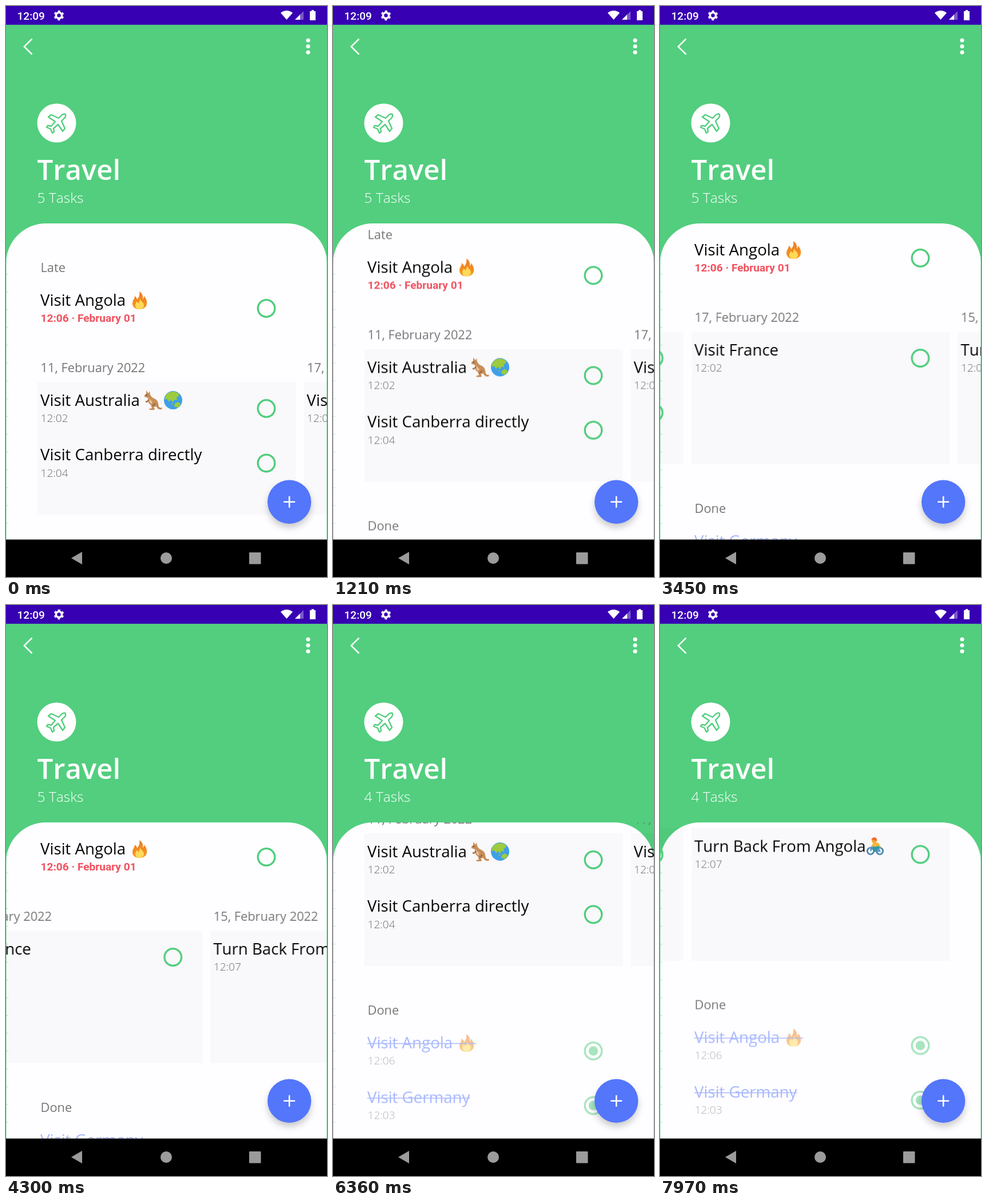
These frames come from a looping animation (561x998 px, 8 s). An HTML page:

```html
<!DOCTYPE html>
<html lang="en">
<head>
<meta charset="utf-8">
<title>Travel tasks</title>
<style>
  html, body { margin: 0; width: 100%; height: 100%; overflow: hidden; background: #52ce7e; }
  svg { display: block; width: 100vw; height: 100vh; font-family: "Open Sans", sans-serif; font-kerning: none; }
  .heading { font-size: 21.84px; fill: #767676; }
  .title { font-size: 27.65px; fill: #060606; }
  .time { font-size: 19.1px; font-weight: 300; fill: #6c6c6c; }
  .late { font: 700 19.1px Roboto, sans-serif; fill: #f0525f; }
  .praise { fill: #757575; }
  .hint { font-size: 19.1px; font-weight: 300; fill: #5f7de4; }
  .done { opacity: .5; }
  .done .title { fill: #5376fc; }
  .strike { stroke: #5376fc; stroke-width: 1.6; }
  .count { font-size: 24.57px; font-weight: 300; fill: #fff; }
  .ring { fill: none; stroke: #4fcd7c; stroke-width: 3.3; }
  .card { fill: #000; fill-opacity: .02; }
  #fab { filter: drop-shadow(0 7px 6px rgba(0, 0, 0, .2)); }
</style>
</head>
<body>
<svg viewBox="0 0 561 998" preserveAspectRatio="none">
  <defs>
    <clipPath id="listArea"><rect y="380" width="561" height="553"/></clipPath>
    <linearGradient id="flame" x2="0" y2="1">
      <stop stop-color="#ee7a24"/><stop offset="1" stop-color="#f79a1e"/>
    </linearGradient>
    <g id="fire">
      <path fill="url(#flame)" d="M13 0C18 3 20 8 19 13C21 12 21 10 21 8C25 12 27 17 26 22C25 28 20 31 13 31C6 31 1 27 1 21C1 15 5 13 5 8C8 10 9 12 9 14C13 10 14 5 13 0Z"/>
      <path fill="#ffd95a" d="M14 12C15 17 21 19 21 24C21 28 18 31 13 31C9 31 6 28 6 24C6 21 8 20 8 18C10 18 11 19 11 21C14 18 14 15 14 12Z"/>
    </g>
    <g id="kangaroo">
      <path fill="#c78d58" d="M4 0L8 5L10 1L11 7C13 12 16 13 20 15C25 18 25 23 26 28C28 31 30 30 32 30L31 33C25 34 23 31 22 28L17 29L19 32L18 34H10L9 32L14 31L12 25C8 23 7 19 7 13L1 11Q0 8 4 6Z"/>
      <path fill="#e7c199" d="M8 13C9 18 10 22 13 24L15 20Z"/>
      <path fill="none" stroke="#99633a" stroke-width="2" d="M9 16L5 20L3 19M20 23L15 27"/>
      <circle cx="5" cy="8" r="1" fill="#3b2a20"/>
    </g>
    <g id="globe">
      <circle r="16" fill="#3f9fe6"/>
      <path fill="#9ccb3f" d="M-13-9Q-7-16 3-15L11-11L9-6L6-5L7 0L2-1L0 4L-4-1L-7 3L-10-2L-15-1ZM3 6L8 3L13 6Q12 11 8 13L2 11ZM-4 5L1 7L-1 8Z"/>
    </g>
    <g id="biker">
      <g fill="none" stroke="#3f7fa6" stroke-width="2.6">
        <circle cx="7" cy="24" r="5.700"/><circle cx="23" cy="24" r="5.700"/>
        <path stroke="#4a8fd0" d="M7 24L10 16L16 24H23L19 17H10"/>
      </g>
      <path fill="#f6b93a" d="M12 9L20 9L25 16L20 19L12 15Z"/>
      <path fill="none" stroke="#f6b93a" stroke-width="3" d="M13 11L9 16"/>
      <path fill="none" stroke="#2b9c9c" stroke-width="4" d="M22 17L14 19L16 25"/>
      <circle cx="13" cy="6" r="4" fill="#f2a93c"/>
      <path fill="#ef6a2c" d="M8 4Q10 0 15 0Q19 2 18 7Q12 4 8 4Z"/>
    </g>
  </defs>

  <rect width="561" height="998" fill="#52ce7e"/>
  <rect width="561" height="32.800" fill="#3700b3"/>
  <g fill="#fff">
    <text x="19.5" y="24" style="font:500 19.1px Roboto,sans-serif">12:09</text>
    <g fill="none" stroke="#fff">
      <circle cx="92.500" cy="16.500" r="5" stroke-width="3.6"/>
      <circle cx="92.500" cy="16.500" r="7.600" stroke-width="2.400" stroke-dasharray="4 3.96" stroke-dashoffset="-1.98"/>
    </g>
    <path d="M480 12Q490.500 4 501 12L490.500 24Z"/>
    <path d="M520 9V24H505Z" opacity=".35"/><path d="M514 15V24H505Z"/>
    <path d="M531 9H534V7H538V9H541V25H531Z"/>
    <path d="M45.500 57.500L31.800 71L45.500 84.500" fill="none" stroke="#fff" stroke-width="2.500"/>
    <circle cx="528" cy="60" r="3.6"/><circle cx="528" cy="70.500" r="3.6"/><circle cx="528" cy="81" r="3.6"/>
    <circle cx="88.500" cy="204.500" r="34"/>
    <text x="54.500" y="304" font-size="49.1" font-weight="600">Travel</text>
  </g>
  <path fill="none" stroke="#52ce7e" stroke-width="2.4" stroke-linejoin="round"
    d="M98 190L92 196L79 190L74 194L86 202L79 210L73 209L71 212L78 215L81 222L84 220L83 214L91 207L99 219L103 214L97 201L103 195Q107 186 98 190Z"/>
  <text class="count" id="fiveTasks" x="54.500" y="344">5 Tasks</text>
  <text class="count" id="fourTasks" x="54.500" y="344">4 Tasks</text>

  <path fill="#fefdff" d="M0 933V450A70 70 0 0 1 70 380H491A70 70 0 0 1 561 450V933Z"/>
  <g stroke="#52ce7e" opacity=".5">
    <path d="M.5 440V933M560.500 440V933"/>
    <path d="M2 436.500V906" stroke-width="4" stroke-dasharray="1 30.15"/>
  </g>

  <g clip-path="url(#listArea)">
    <g id="list">
      <text class="heading" x="60.500" y="465">Late</text>
      <g id="overdue"></g>
      <g id="praise">
        <text class="title praise" x="60" y="523.500">You're doing great!</text>
        <text class="hint" x="60" y="551.500">You don'thave any overdue goals!</text>
      </g>
      <g id="ripple">
        <circle cx="455" cy="528.500" r="33" fill="#e2e1e3"/>
        <circle cx="455" cy="528.500" r="14.800" fill="#dbdfe0" stroke="#c5d0cb" stroke-width="3.3"/>
      </g>
      <g id="pages"></g>
      <text class="heading" x="60.500" y="974">Done</text>
      <g id="doneAngola" class="done"></g>
      <g id="doneGermany" class="done"></g>
    </g>
  </g>

  <circle id="fab" cx="495.200" cy="866.800" r="38.200" fill="#5376fb"/>
  <path d="M485.200 866.800H505.200M495.200 856.800V876.800" stroke="#fff" stroke-width="2.600"/>
  <rect y="932.500" width="561" height="65.500"/>
  <g fill="#9b9b9b">
    <path d="M114 965L133 954V976Z"/>
    <circle cx="280" cy="965" r="10"/>
    <rect x="425" y="955" width="20.500" height="20.500" rx="1"/>
  </g>
</svg>
<script>
const LOOP = 8000, TAP = 5250, PAGE = 465.5, ROW = 95.5;
const $ = id => document.getElementById(id);

const emoji = (name, x, y) => `<use href="#${name}" x="${x}" y="${y}"/>`;

// One row: title, time line and round check button; y is the title's baseline.
// A finished row is struck through up to x = strikeTo and has a filled button.
const task = (title, time, y, { art = '', timeClass = 'time', strikeTo = 0 } = {}) => `
  <text class="title" x="60" y="${y}">${title}</text>${art}
  <text class="${timeClass}" x="60.5" y="${y + 28.5}">${time}</text>
  <circle class="ring" cx="455" cy="${y + 5}" r="14.8"/>
  ${strikeTo ? `<circle cx="455" cy="${y + 5}" r="8.2" fill="#4fcd7c"/>
    <path class="strike" d="M60 ${y - 8}H${strikeTo}"/>` : ''}`;

const page = (index, date, tasks) => `
  <g transform="translate(${index * PAGE})">
    <text class="heading" x="60.5" y="640">${date}, February 2022</text>
    <rect class="card" x="55" y="657" width="451.5" height="232"/>${tasks}
  </g>`;

$('overdue').innerHTML = task('Visit Angola', '12:06 · February 01', 523.5,
  { art: emoji('fire', 220, 499), timeClass: 'late' });
$('pages').innerHTML =
  page(0, 11, task('Visit Australia', '12:02', 698.5,
      { art: emoji('kangaroo', 241, 672) + emoji('globe', 292, 689) }) +
    task('Visit Canberra directly', '12:04', 794)) +
  page(1, 17, task('Visit France', '12:02', 698.5)) +
  page(2, 15, task('Turn Back From Angola', '12:07', 698.5, { art: emoji('biker', 361, 673.5) }));
$('doneAngola').innerHTML = task('Visit Angola', '12:06', 1032.5,
  { art: emoji('fire', 220, 1008), strikeTo: 250 });
$('doneGermany').innerHTML = task('Visit Germany', '12:03', 1032.5 + ROW, { strikeTo: 239.5 });

// Rows are [time, value, easing towards the next row].
function play(id, property, rows, format = v => v) {
  const steps = [[0, rows[0][1]], ...rows, [LOOP, rows.at(-1)[1]]];
  $(id).animate(steps.map(([time, value, easing = 'linear']) =>
    ({ offset: time / LOOP, [property]: format(value), easing })),
    { duration: LOOP, iterations: Infinity });
}
const switchAt = (id, before, after) =>
  play(id, 'opacity', [[TAP, before], [TAP, after]]);
const moveX = v => `translate(${-v}px, 0px)`;
const moveY = v => `translate(0px, ${-v}px)`;
const SWIPE = 'cubic-bezier(.35, .1, .2, 1)';

play('list', 'transform', [
  [250, 0], [600, 15], [910, 39.5], [1500, 75, 'ease-out'], [2120, 87], [2400, 88],
  [5950, 88, 'ease-in'], [6130, 150], [6360, 258, 'ease-out'], [6600, 267.5]
], moveY);
play('pages', 'transform', [
  [2550, 0, SWIPE], [3080, PAGE], [3560, PAGE, SWIPE], [4020, 2 * PAGE],
  [4150, 2 * PAGE, SWIPE], [4540, PAGE], [4580, PAGE, SWIPE], [4980, 0],
  [6700, 0, SWIPE], [7180, PAGE], [7330, PAGE, SWIPE], [7830, 2 * PAGE]
], moveX);
play('doneGermany', 'transform', [[TAP, ROW], [TAP, 0]], moveY);
play('ripple', 'opacity', [[5120, 0], [5220, 1], [5400, 1], [5680, 0]]);
switchAt('overdue', 1, 0);
switchAt('praise', 0, 1);
switchAt('fiveTasks', 1, 0);
switchAt('fourTasks', 0, 1);
switchAt('doneAngola', 0, .5);
</script>
</body>
</html>
```
